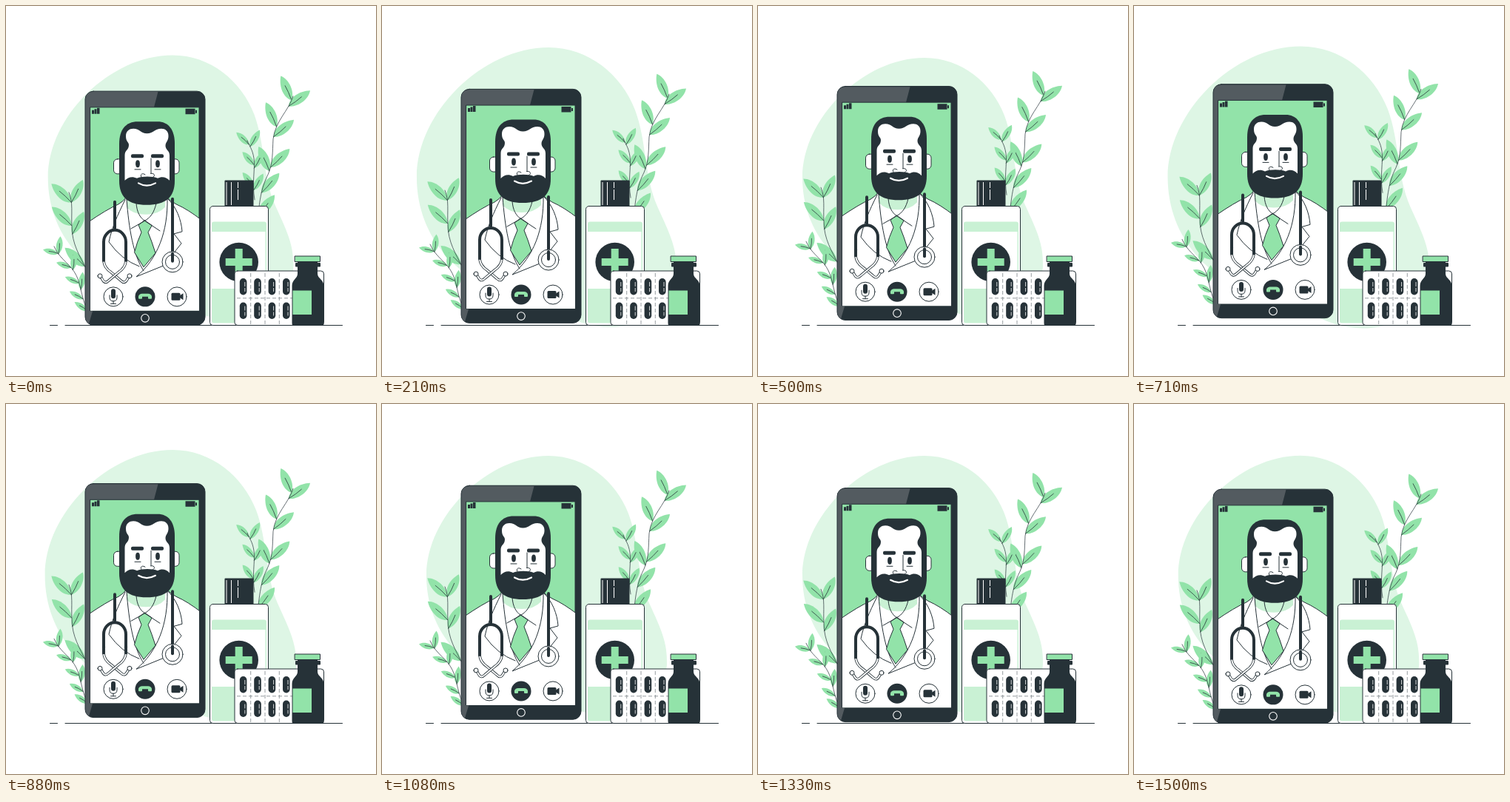
An HTML page that plays this animation: 500x500 px, repeating every 1.54 s.

```html
<!DOCTYPE html>
<html lang="en">
<head>
<meta charset="utf-8">
<title>Online doctor</title>
<style>
html, body { margin: 0; width: 100%; height: 100%; overflow: hidden; background: #fff; }
svg { display: block; width: 100%; height: 100%; }
.d { fill: #263238; }
.g { fill: #92e3a9; }
.w { fill: #fff; }
.p { fill: #c9f1d4; }
.l { stroke: #263238; stroke-linejoin: round; stroke-linecap: round; }
.n { fill: none; }
.tube { fill: none; stroke: #263238; stroke-width: 4; stroke-linecap: round; }
.thin { fill: none; stroke: #263238; stroke-width: .7; stroke-linecap: round; }
</style>
</head>
<body>
<svg viewBox="0 0 500 500">
  <defs>
    <clipPath id="screen"><rect x="114" y="137" width="147" height="275"/></clipPath>
  </defs>

  <path id="blob" fill="#def6e5" d="M225 70C275 70 316 104 333 148C348 188 344 230 361 269C377 304 386 322 385 352C383 396 345 420 303 420C250 420 220 385 170 375C115 362 60 310 60 232C60 152 142 70 225 70Z"/>

  <path class="l" d="M80 431.500H454.500M59.500 431.500H69.500"/>

  <g id="plants"></g>

  <g id="phone">
    <rect class="d l" x="107" y="115.300" width="162" height="316" rx="11"/>
    <path fill="#535b60" d="M107.500 126Q108 116 118 116H205.500L200 137L117.500 411L112 429.500Q107.500 427 107.500 420Z"/>
    <rect class="g l" x="114" y="137" width="147" height="275"/>
    <g clip-path="url(#screen)">
      <!-- coat, shirt, tie -->
      <path class="w l" d="M110 293Q136 275 152 268Q159 264 163 258H217Q221 263 230 268Q246 275 265 290V416H110Z"/>
      <path class="p" d="M163 262H215V272Q206 282 189 282Q171 282 163 272Z"/>
      <path class="n l" d="M163 261C166 301 172 337 186 358M161 262C150 284 143 300 139 319Q156 343 180 352M218 260C219 305 205 342 176 366L213 351L237 321L227 308L238 305C237 289 230 271 218 260"/>
      <path class="g l" d="M187 290L179 296L183 306Q177 319 173.500 333L186 353L202 334Q197 318 192 306L197 297Z"/>
      <path class="n l" d="M176 267C177 279 181 286 187.500 290.500L169 301M203 267C200 280 195 286 187.500 290.500L208 304"/>
      <!-- stethoscope -->
      <path class="tube" d="M147 265V301M132 344V319A15 16 0 0 1 162 319V344M225 261V344"/>
      <g id="arms"></g>
      <circle class="w l" cx="225" cy="346" r="14"/>
      <circle class="w l" cx="225" cy="346" r="9.500"/>
      <path class="tube" d="M225 335V345"/>
      <!-- head -->
      <rect class="w l" x="145.500" y="207" width="13" height="20" rx="5"/>
      <rect class="w l" x="221" y="207" width="13" height="20" rx="5"/>
      <path class="d" d="M153 187C153 167 162 156.500 178 156.500H205C219 156.500 228 167 228 186V236C228 259 216 269 190 269C165 269 153 259 153 236Z"/>
      <path class="w" d="M160.500 236V202C160.500 195 166 195 166 188C166 184 162 184 162 176C162 169 167 166 172 166C181 166 182 172.500 190.500 172.500C199 172.500 201 166 210 166C215 166 219.500 169 219.500 176C219.500 183 215.500 184 215.500 189C215.500 195 221 195 221 202V236C217 231 210 230 205 233C199 230 183 230 177 233C171 230 165 231 160.500 236Z"/>
      <g id="eyes"></g>
      <path class="n l" d="M196 206V226"/>
      <path class="w l" d="M183 231.500C180.500 227 185 225.500 188 228M195.500 226.500C201 225.500 202 230 198.500 231.500"/>
      <path d="M179 239.500Q190 246 202 239.500" fill="none" stroke="#fff" stroke-width="2.200" stroke-linecap="round"/>
      <!-- call buttons -->
      <circle class="w l" cx="145" cy="393" r="13"/>
      <rect class="d" x="142" y="382.500" width="6" height="13" rx="3"/>
      <path class="n l" d="M140 391V394Q140 399 145 399Q150 399 150 394V391M145 399V402.500M141.500 402.500H148.500"/>
      <circle class="d" cx="188" cy="393" r="13.500"/>
      <path class="g" d="M179 395V392.500Q180 389 184 389H192Q196 389 197 392.500V395Q197 396 196 396H193Q192 396 192 395V393H184V395Q184 396 183 396H180Q179 396 179 395Z"/>
      <circle class="w l" cx="231" cy="393" r="13"/>
      <rect class="d" x="223.500" y="388" width="12" height="10" rx="1.500"/>
      <path class="d" d="M235 391.500L239.500 388.500V397.500L235 394.500Z"/>
    </g>
    <path class="d" d="M116 141H119V146H116ZM119.500 139.500H122.500V146H119.500ZM123 138H126.500V146H123ZM242.500 139H255.500V146.500H242.500ZM256 141H258V145H256Z"/>
    <circle cx="188" cy="422" r="5.300" fill="none" stroke="#fff" stroke-width="1.100"/>
  </g>

  <g id="meds">
    <rect class="d" x="295.500" y="235.500" width="39" height="36" rx="1"/>
    <path d="M298 238V269M304.500 238V269M313.500 238V246M313.500 248V262" stroke="#fff"/>
    <rect class="w l" x="275.500" y="270.500" width="79" height="161" rx="4"/>
    <rect class="p" x="278" y="291.500" width="74" height="137" rx="3"/>
    <rect class="w" x="276" y="305" width="74.500" height="77"/>
    <circle class="d" cx="314.700" cy="346" r="26.300"/>
    <path d="M314.700 328V364M296.700 346H332.700" stroke="#92e3a9" stroke-width="10"/>

    <rect class="w l" x="309" y="358" width="120.500" height="73.500" rx="4"/>
    <path d="M312 394.800H388M330.700 361V430M350 361V430M369.300 361V430" stroke="#7d858a" stroke-width=".8" stroke-dasharray="5 3"/>
    <g id="pills"></g>
    <path class="d" d="M394 345H421V362C421 368 429.500 370 429.500 378V429Q429.500 432 426.500 432H389.500Q386.500 432 386.500 429V378C386.500 370 394 368 394 362Z"/>
    <rect class="d" x="391" y="347" width="34" height="5.500" rx="1"/>
    <rect class="g l" x="390.500" y="338" width="34" height="7.500"/>
    <rect class="g" x="387.500" y="384.500" width="25.500" height="32.500"/>
  </g>
</svg>

<script>
const $ = id => document.getElementById(id);
const LOOP = 1540, FLOAT = 1500, RISE = 10;

// A pointed leaf along the x axis, turned to its angle
function leaf({ x, y }, angle, len) {
  const h = len * 0.24;
  return `<g transform="translate(${x} ${y}) rotate(${angle})">` +
    `<path class="g" d="M0 0C${len * .2} ${-h} ${len * .65} ${-h} ${len} 0C${len * .75} ${h} ${len * .25} ${h} 0 0Z"/>` +
    `<path class="thin" d="M0 0Q${len * .35} 1 ${len * .6} 0"/></g>`;
}

// Leaves on one side, walking down from the tip; grow widens the gaps
function row(stem, { n, from, gap, grow = 0, angle, turn = 0, len }) {
  return Array.from({ length: n }, (_, i) =>
    leaf(stem.getPointAtLength(from + i * (gap + grow * i)), angle + turn * i, len)).join('');
}

function sprig(d, left, right) {
  const stem = document.createElementNS('http://www.w3.org/2000/svg', 'path');
  stem.setAttribute('d', d);
  return row(stem, left) + row(stem, right) + `<path class="thin" d="${d}"/>`;
}

$('plants').innerHTML =
  sprig('M388 122C382 142 364 155 361 180C360 198 361 212 354 228C347 242 342 258 340 295',
    { n: 3, from: 6, gap: 31, grow: 10, angle: -114, len: 36 },
    { n: 5, from: 15, gap: 49, grow: -2.5, angle: -36, turn: -4, len: 36 }) +
  sprig('M326 182C329 190 333 193 335 206C337 220 332 240 336 262',
    { n: 3, from: 6, gap: 29, angle: -136, turn: 4, len: 24 },
    { n: 3, from: 9, gap: 30, angle: -60, len: 26 }) +
  sprig('M85 252C91 266 88 280 89 298C89 322 100 338 108 355',
    { n: 3, from: 14, gap: 18, grow: 13.5, angle: -137, len: 37 },
    { n: 2, from: 14, gap: 43, angle: -63, len: 34 }) +
  sprig('M65 325C71 340 84 347 92 359C102 374 100 390 110 412',
    { n: 5, from: 11, gap: 27, grow: -1, angle: -166, turn: 5, len: 21 },
    { n: 3, from: 12, gap: 29, angle: -84, len: 24 });

// Stethoscope arms mirror each other about x = 147
const bend = 'M132 345Q133 354 142 360L155 371Q160 376 163 371L166 366';
const arm = `<path class="thin" style="stroke-width:3.6" d="${bend}"/>` +
  `<path class="thin" style="stroke:#fff;stroke-width:1.9" d="${bend}"/>` +
  '<circle class="w l" cx="167" cy="365" r="3"/><path class="tube" d="M132 336V344"/>';
$('arms').innerHTML = arm + `<g transform="translate(294) scale(-1 1)">${arm}</g>`;

$('eyes').innerHTML = [178, 205].map(x =>
  `<rect class="d" x="${x - 9}" y="200.500" width="17" height="5" rx="2"/>` +
  `<ellipse class="d" cx="${x}" cy="213.500" rx="2.900" ry="5"/>` +
  `<path class="l" d="M${x - 4} 221h8"/>`).join('');

let pills = '';
for (let i = 0; i < 8; i++) {
  const x = 315.8 + (i % 4) * 19.4, y = i < 4 ? 368 : 400.5;
  pills += `<rect class="d" x="${x}" y="${y}" width="9.600" height="22.500" rx="4.800"/>` +
    `<path d="M${x + 7} ${y + 5}v6m0 2v5" stroke="#fff" stroke-width=".8"/>`;
}
$('pills').innerHTML = pills;

// Linear rise to a peak at time 0 and fall after it
const bump = (t, up, down) => Math.max(0, 1 - (t < 0 ? -t / up : t / down));

function swell(t) {
  const s = t > 1498 ? t - LOOP : t;
  return 1 + 0.1 * bump(s - 170, 212, 210) + 0.092 * bump(s - 718, 213, 322);
}

function draw(t) {
  const f = ((t + 25) % FLOAT) / FLOAT;
  const lift = `translate(0 ${0.2 - RISE * (1 - Math.abs(1 - 2 * f))})`;
  $('phone').setAttribute('transform', lift);
  $('plants').setAttribute('transform', lift);
  $('blob').setAttribute('transform', `translate(222.5 245) scale(${swell(t)}) translate(-222.5 -245)`);
}

const start = performance.now();
function tick() {
  draw((performance.now() - start) % LOOP);
  requestAnimationFrame(tick);
}
tick();
</script>
</body>
</html>
```
